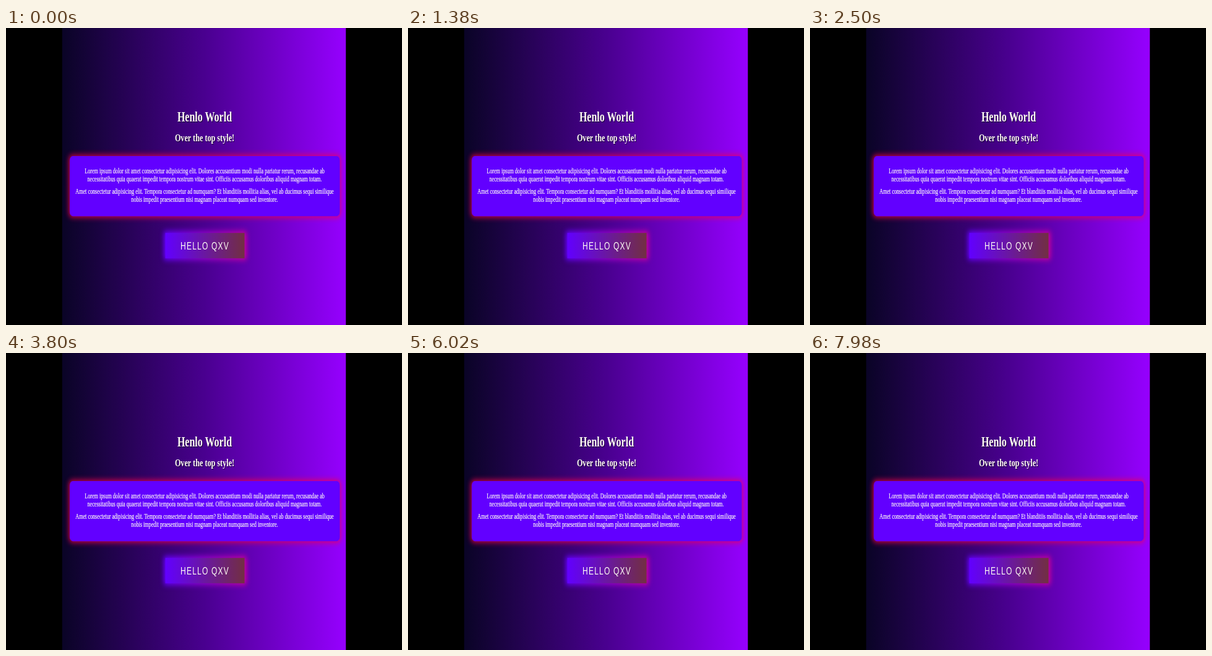
Animation, 640 px wide and 480 px high, one loop 8 s. Source, as an HTML page:

```html
<!DOCTYPE html>
<html lang="en">
<head>
<meta charset="utf-8">
<title>Over the top style</title>
<style>
  html, body { margin: 0; width: 100%; height: 100%; overflow: hidden; background: #000; }
  svg { display: block; width: 100%; height: 100%; }
  text { text-anchor: middle; fill: #fffff4; }
  .serif { font-family: "Liberation Serif", "Times New Roman", serif; }
  .title { font-size: 32px; font-weight: bold; }
  .subtitle { font-size: 24.4px; font-weight: bold; }
  .body { font-size: 16.27px; stroke: #fffff4; stroke-width: .3px; }
  .label { font: 24px "Liberation Sans", Arial, sans-serif; letter-spacing: 2.4px; }
  .shadow { filter: drop-shadow(2px 2px 1px rgba(0, 0, 0, .5)); }
  .glow { filter: blur(7px); }
</style>
</head>
<body>
<svg viewBox="0 0 640 480">
  <defs>
    <linearGradient id="sky">
      <stop offset="0" stop-color="#0a0426"/>
      <stop offset=".5" stop-color="#49008f"/>
      <stop offset="1" stop-color="#9600ff"/>
    </linearGradient>
    <linearGradient id="buttonGlow">
      <stop offset="0" stop-color="#6200ff"/>
      <stop offset="1" stop-color="#c8009a"/>
    </linearGradient>
    <linearGradient id="buttonFill">
      <stop offset="0" stop-color="#6200ff"/>
      <stop offset="1" stop-color="#722f42"/>
    </linearGradient>
    <clipPath id="page"><rect x="90.5" width="459" height="480"/></clipPath>
  </defs>

  <rect width="640" height="480"/>
  <g clip-path="url(#page)">
    <rect x="90.5" width="459" height="480" fill="url(#sky)"/>

    <!-- The page is shown at half width and 72% height. -->
    <g transform="translate(91) scale(.5 .72)">
      <rect class="glow" x="21" y="285" width="878" height="140" rx="10" fill="#f0004c" opacity=".85"/>
      <rect x="24" y="287.5" width="873" height="135" rx="10" fill="#6200ff"/>
      <rect class="glow" x="328" y="456" width="268" height="65" rx="6" fill="url(#buttonGlow)"/>
      <rect x="333" y="460" width="256" height="57" fill="url(#buttonFill)"/>

      <g class="serif">
        <g class="shadow">
          <text class="title" x="460" y="210">Henlo World</text>
          <text class="subtitle" x="460" y="253.5">Over the top style!</text>
        </g>
        <g class="body">
          <text x="460" y="326">Lorem ipsum dolor sit amet consectetur adipisicing elit. Dolores accusantium modi nulla pariatur rerum, recusandae ab</text>
          <text x="460" y="344">necessitatibus quia quaerat impedit tempora nostrum vitae sint. Officiis accusamus doloribus aliquid magnam totam.</text>
          <text x="460" y="372.5">Amet consectetur adipisicing elit. Tempora consectetur ad numquam? Et blanditiis mollitia alias, vel ab ducimus sequi similique</text>
          <text x="460" y="390.5">nobis impedit praesentium nisi magnam placeat numquam sed inventore.</text>
        </g>
      </g>
      <text class="label" x="461" y="497">HELLO QXV</text>
    </g>
  </g>
</svg>
</body>
</html>
```
